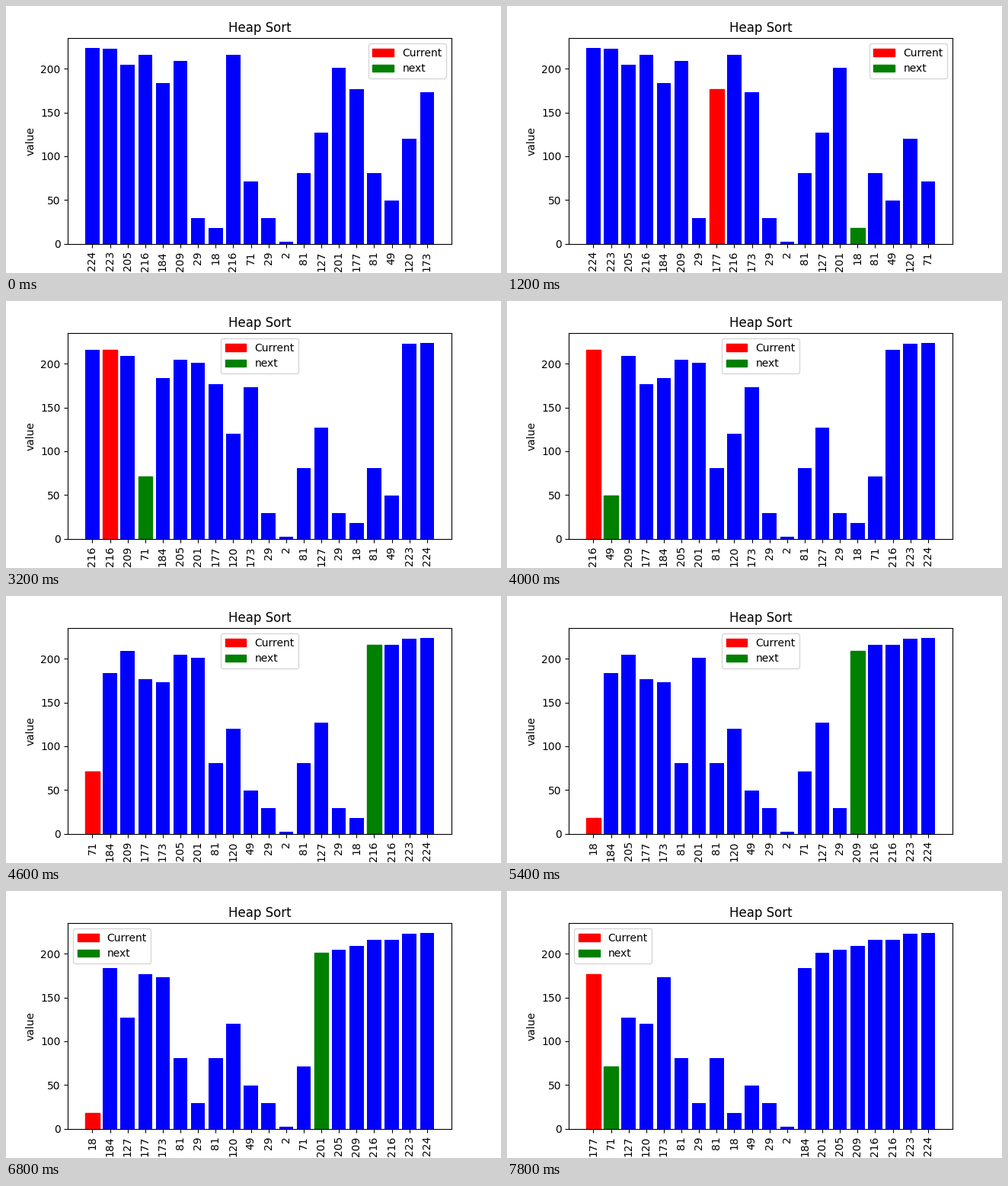
Animation, 650 px wide and 350 px high, one loop 8 s. Source, as a matplotlib script:

```python
import matplotlib.pyplot as plt
from matplotlib.animation import FuncAnimation
from matplotlib.patches import Patch

VALUES = [224, 223, 205, 216, 184, 209, 29, 18, 216, 71,
          29, 2, 81, 127, 201, 177, 81, 49, 120, 173]
FRAMES = 40
INTERVAL = 200
HOLD = 4  # frames the first pair stays marked before sorting starts


def sift_down(data, size, root):
    """Yield (current, next) after every swap on the way down."""
    while True:
        largest = root
        for child in (2 * root + 1, 2 * root + 2):
            if child < size and data[child] > data[largest]:
                largest = child
        if largest == root:
            return
        data[root], data[largest] = data[largest], data[root]
        yield root, largest
        root = largest


def heap_sort(data):
    count = len(data)
    for root in reversed(range(count // 2)):
        yield from sift_down(data, count, root)
    for end in range(count - 1, 0, -1):
        data[0], data[end] = data[end], data[0]
        yield 0, end
        yield from sift_down(data, end, 0)


def build_states():
    """List one (values, marked pair) state per frame."""
    data = VALUES.copy()
    states = [(data.copy(), None)] + [(data.copy(), (0, 1))] * HOLD
    for pair in heap_sort(data):
        if len(states) == FRAMES:
            break
        states.append((data.copy(), pair))
    return states


states = build_states()

fig, ax = plt.subplots(figsize=(6.5, 3.5), dpi=100)
positions = range(len(VALUES))
bars = ax.bar(positions, VALUES, color="blue")
ax.set_title("Heap Sort")
ax.set_ylabel("value")
ax.set_xticks(positions, VALUES, rotation=90)
ax.legend(handles=[Patch(color="red", label="Current"),
                   Patch(color="green", label="next")], loc="best")


def update(frame):
    values, pair = states[frame]
    for bar, value in zip(bars, values):
        bar.set_height(value)
        bar.set_facecolor("blue")
        bar.set_edgecolor("none")
    if pair:
        current, following = pair
        bars[current].set_color("red")
        bars[following].set_color("green")
    ax.set_xticklabels(values)
    return list(bars)


anim = FuncAnimation(fig, update, frames=FRAMES, interval=INTERVAL,
                     init_func=lambda: update(0), repeat=True,
                     repeat_delay=0, blit=False)
plt.show()
```
